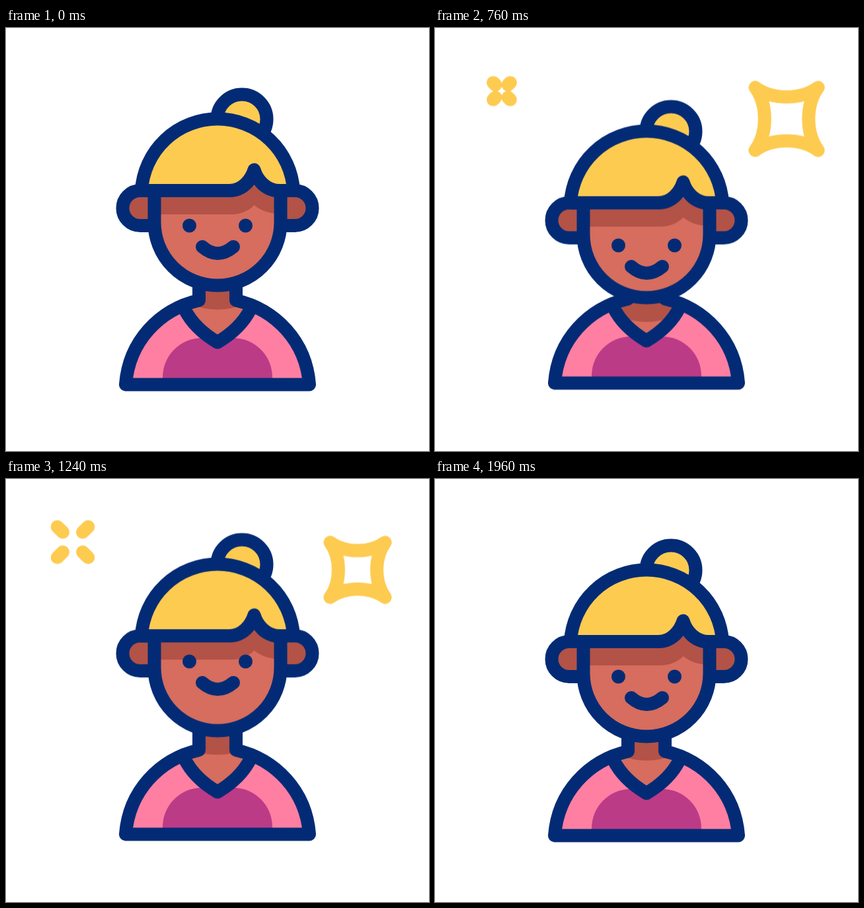
These frames come from a looping animation (640 by 640 pixels, 2200 ms). An HTML page:

```html
<!DOCTYPE html>
<html lang="en">
<head>
<meta charset="utf-8">
<title>Jumping avatar</title>
<style>
  html, body { margin: 0; width: 100%; height: 100%; overflow: hidden; background: #fff; }
  svg { display: block; width: 100%; height: 100%; }

  .line { fill: none; stroke: #032b75; stroke-width: 20; stroke-linecap: round; stroke-linejoin: round; }
  .ink { fill: #032b75; }
  .skin { fill: #d66d5e; }
  .shade { fill: #b35246; }
  .hair { fill: #fecb51; }
  .pink { fill: #ff7fa2; }
  .plum { fill: #bc3b87; }
  .spark { fill: none; stroke: #fecb51; stroke-width: 20; stroke-linecap: round; stroke-linejoin: round; vector-effect: non-scaling-stroke; }

  .hop, .face, .star, .ray, .burst {
    animation: 2200ms cubic-bezier(.3333, 0, .6667, 1) infinite;
  }
  .hop { animation-name: hop; }
  .body { --low: 13px; --high: -30px; }
  .unbody { --low: -13px; --high: 30px; }
  .head { --low: 36.2px; --high: -51px; animation-delay: 45ms; }
  .face { animation-name: face; }
  .star { animation-name: star; }
  .ray { animation-name: ray; }
  .burst { animation-name: burst; }

  /* crouch, leap, land, settle */
  @keyframes hop {
    0%, 9.091%, 81.818%, 100% { transform: translateY(0); }
    27.273%, 63.636% { transform: translateY(var(--low)); }
    45.455% { transform: translateY(var(--high)); }
  }
  /* features lag behind the head */
  @keyframes face {
    0%, 16.364%, 88.182%, 100% { transform: translateY(0); }
    32.727%, 72.727% { transform: translateY(12px); }
    54.545% { transform: translateY(-15px); }
  }
  @keyframes star {
    0%, 22.727% { transform: scale(.22); opacity: 0; }
    27.273% { transform: scale(.33); opacity: .93; }
    33.182% { transform: scale(.48); opacity: 1; }
    47.955% { transform: scale(.31); opacity: 1; }
    62.5% { transform: scale(.48); opacity: 1; }
    71%, 100% { transform: scale(.22); opacity: 0; }
  }
  @keyframes ray {
    0%, 31.818% { d: path("M8 8L8 8"); }
    40.909% { d: path("M15 15L29.8 29.8"); }
    55.455%, 60% { d: path("M15 15L23.3 23.3"); }
    64.545%, 100% { d: path("M15 15L15 15"); }
  }
  @keyframes burst {
    0%, 31.818% { opacity: 0; }
    34.545%, 61.818% { opacity: 1; }
    65.455%, 100% { opacity: 0; }
  }
</style>
</head>
<body>
<svg viewBox="0 0 640 640">
  <defs>
    <path id="neck" d="M292 335V412L270 425Q285 455 320 474.500Q355 455 370 425L348 412V335Z"/>
    <path id="jaw" d="M224.500 246V294A95.500 95.500 0 0 0 415.500 294V246Z"/>
    <path id="cap" d="M205 246A115.200 115.200 0 0 1 435 246H414C394 246 380 230 375.500 214.500C371 229 358 246 338 246Z"/>
    <path id="ear" d="M225 246H203A26.500 26.500 0 0 0 203 299H225"/>
    <clipPath id="inNeck"><use href="#neck"/></clipPath>
    <clipPath id="inJaw"><use href="#jaw"/></clipPath>
  </defs>

  <g transform="translate(532 137.500)">
    <path class="spark star" d="M-100-100C-45-60 45-60 100-100C60-45 60 45 100 100C45 60-45 60-100 100C-60 45-60-45-100-100Z"/>
  </g>

  <g transform="translate(101 95.500)">
    <g class="burst">
      <path class="spark ray" d="M15 15L15 15"/>
      <g transform="rotate(90)"><path class="spark ray" d="M15 15L15 15"/></g>
      <g transform="rotate(180)"><path class="spark ray" d="M15 15L15 15"/></g>
      <g transform="rotate(270)"><path class="spark ray" d="M15 15L15 15"/></g>
    </g>
  </g>

  <g class="hop body">
    <path class="pink" d="M292 412C232 426 186 474 181 539.500H459C454 474 408 426 348 412Z"/>
    <path class="plum" d="M237 538V529C237 495 264 469 297 469H343C376 469 403 495 403 529V538Z"/>
    <use href="#neck" class="skin"/>
    <g clip-path="url(#inNeck)">
      <g class="hop unbody">
        <g class="hop head"><circle class="shade" cx="320" cy="321" r="105"/></g>
      </g>
    </g>
    <path class="line" d="M270 425Q285 455 320 475.500Q355 455 370 425"/>
    <path class="line" d="M292 345V412C232 426 186 474 181 539.500H459C454 474 408 426 348 412V345"/>
  </g>

  <g class="hop head">
    <circle class="hair" cx="357" cy="138" r="37.500"/>
    <circle class="line" cx="357" cy="138" r="37.500"/>
    <g id="ears">
      <use href="#ear" class="shade"/>
      <use href="#ear" class="line"/>
      <g transform="matrix(-1 0 0 1 640 0)">
        <use href="#ear" class="shade"/>
        <use href="#ear" class="line"/>
      </g>
    </g>
    <use href="#jaw" class="skin"/>
    <path class="shade" clip-path="url(#inJaw)" d="M220 240H420V282C398 281 385 276 375.500 268C368 276 356 282 340 282H220Z"/>
    <use href="#jaw" class="line"/>
    <path class="skin" d="M338 256C355 256 368 247 375.500 237C383 247 394 254 406 256Z" style="fill:#b35246"/>
    <use href="#cap" class="hair"/>
    <use href="#cap" class="line"/>
    <g class="face">
      <circle class="ink" cx="277.500" cy="299" r="10.500"/>
      <circle class="ink" cx="362.500" cy="299" r="10.500"/>
      <path class="line" d="M297 331Q320 351 344 331"/>
    </g>
  </g>
</svg>
</body>
</html>
```
